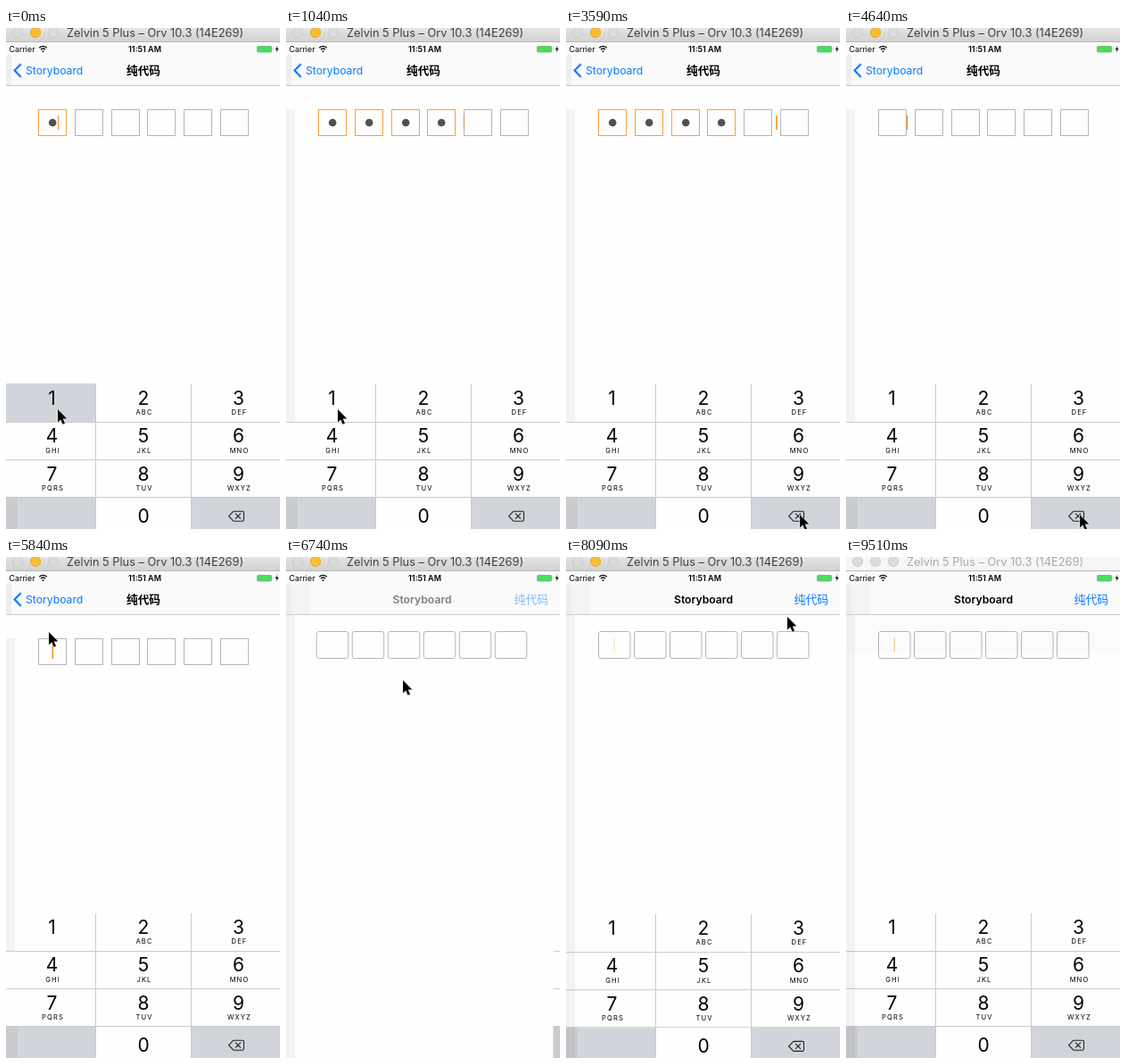
Write an HTML page that moves like this. It is 307 px wide and 561 px high and loops after 9.53 s.

```html
<!DOCTYPE html>
<html lang="zh">
<head>
<meta charset="utf-8">
<title>Passcode field demo</title>
<style>
  html, body { margin: 0; width: 100%; height: 100%; overflow: hidden; background: #fefefe; }
  svg { display: block; width: 307px; height: 561px; font-family: Inter, Roboto, "Liberation Sans", sans-serif; }
  .cjk { font-family: "Noto Sans CJK SC", "Noto Sans CJK", sans-serif; }
  .mid { text-anchor: middle; }
  .blue { fill: #0a7cff; }
  .digit { font-size: 21px; }
  .abc { font-size: 7.6px; letter-spacing: 1.1px; }
  .box { fill: #fefefe; stroke: #b6b6b6; }
  .box.on { stroke: #f9a13a; }
  .caret { fill: #ff8f1f; }
  .sep { stroke: #cbcbcd; fill: none; }
  #bar { fill: url(#metal); }
  #light { fill: #fdbd2e; stroke: #e2a73a; }
  #name { fill: #404040; font-size: 12.8px; }
  .idle #bar { fill: #f6f6f6; }
  .idle #light { fill: #dcdcdc; stroke: #cfcfcf; }
  .idle #name { fill: #a9a9a9; }
</style>
</head>
<body>
<svg id="stage" viewBox="0 0 307 561">
  <defs>
    <linearGradient id="metal" x2="0" y2="1">
      <stop stop-color="#e4e4e4"/><stop offset="1" stop-color="#d2d2d2"/>
    </linearGradient>
  </defs>
  <rect width="307" height="561" fill="#fefefe"/>

  <g id="story">
    <rect y="65" width="307" height="496" fill="#fefefe"/>
    <g id="storyBoxes"></g>
    <rect id="storyCaret" class="caret" x="53.5" y="90" width="1.5" height="16.5"/>
  </g>
  <g id="code">
    <rect y="65" width="307" height="496" fill="#fefefe"/>
    <g id="codeBoxes"></g>
    <rect id="codeCaret" class="caret" y="98" width="1.6" height="16"/>
  </g>

  <g id="pad">
    <rect y="398" width="307" height="163" fill="#fefefe"/>
    <rect id="one" y="398" width="100" height="43" fill="#d1d4db"/>
    <path d="M0 526h100v35H0z" fill="#d1d4db"/>
    <path d="M0 526h13v35H0z" fill="#c9cbcf"/>
    <rect id="back" x="208" y="526" width="99" height="35" fill="#d1d4db"/>
    <path class="sep" d="M100.5 399V561M207.5 399V561M0 441.5H307M0 483.5H307M0 525.5H307"/>
    <g id="keys"></g>
    <path id="erase" d="M249.7 546.7l4.6-5a1.6 1.6 0 0 1 1.2-.5h9.4a1.6 1.6 0 0 1 1.6 1.6v7.8a1.6 1.6 0 0 1-1.6 1.6h-9.4a1.6 1.6 0 0 1-1.2-.5zM257 543.7l6 6M263 543.7l-6 6" fill="none" stroke="#222" stroke-width="1.1"/>
  </g>
  <rect id="strip" width="10" fill="#000" opacity=".045"/>

  <rect y="16" width="307" height="48" fill="#fafafa"/>
  <path class="sep" d="M0 64.5H307"/>
  <path d="M0 31h6v33H0z" opacity=".05"/>
  <path id="navStrip" d="M6 31h22v33H6z" opacity=".025"/>
  <g id="codeNav">
    <g id="goBack">
      <path d="M16.8 40.3l-7.2 7.3 7.2 7.3" fill="none" stroke="#0a7cff" stroke-width="2.2"/>
      <text class="blue" x="22" y="52" font-size="12.2">Storyboard</text>
    </g>
    <text id="codeTitle" class="cjk mid" x="154" y="52" font-size="12.7" font-weight="700">纯代码</text>
  </g>
  <g id="storyNav">
    <text id="storyTitle" class="mid" x="154" y="52" font-size="12.2" font-weight="600">Storyboard</text>
    <text class="cjk blue" x="255.5" y="52" font-size="12.9">纯代码</text>
  </g>

  <text x="3.5" y="27" font-size="8.9">Carrier</text>
  <g fill="none" stroke="#111" stroke-width="1.3">
    <path d="M37.2 22.2a6.2 6.2 0 0 1 8.6 0M39 24.2a3.6 3.6 0 0 1 5 0"/>
    <path d="M41.5 24.9l1.3 1-1.3 1.4-1.3-1.4z" fill="#111" stroke="none"/>
  </g>
  <text class="mid" x="155.5" y="27" font-size="9" font-weight="600">11:51 AM</text>
  <rect x="281.5" y="20.5" width="16" height="6.5" rx="1.3" fill="#4cd964" stroke="#62c973"/>
  <path d="M298.7 22.3q1.6 1.4 0 2.8z" fill="#62c973"/>
  <path d="M304.3 20l-2.6 4.1h1.7l-.7 3.2 2.9-4.2h-1.8z"/>

  <g>
    <rect id="bar" width="307" height="15"/>
    <path d="M0 15.5H307" stroke="#b9b9b9"/>
    <circle cx="13" cy="5" r="5.6" fill="#dcdcdc" stroke="#c9c9c9"/>
    <circle id="light" cx="33" cy="5" r="5.6"/>
    <circle cx="53" cy="5" r="5.6" fill="#dcdcdc" stroke="#c9c9c9"/>
    <text id="name" x="68" y="10">Zelvin 5 Plus – Orv 10.3 (14E269)</text>
  </g>
  <rect id="tint" y="65" width="307" height="42" opacity=".012"/>
  <path id="mouse" d="M0 0V14.6L3.3 11.5 5.6 16.8 8 15.7 5.8 10.5H10.4Z" stroke="#fff" stroke-width="1" paint-order="stroke"/>
</svg>
<script>
const LOOP = 9530;
const $ = id => document.getElementById(id);
const set = (id, attrs) => { for (const k in attrs) $(id).setAttribute(k, attrs[k]); };
const move = (id, x, y = 0) => set(id, { transform: `translate(${x} ${y})` });
const show = (id, on) => set(id, { visibility: on ? 'visible' : 'hidden' });
const clamp = v => Math.max(0, Math.min(1, v));

// fields
const boxX = i => Math.round(36 + 40.8 * i);
let codeHtml = '', storyHtml = '';
for (let i = 0; i < 6; i++) {
  codeHtml += `<rect class="box" x="${boxX(i) + .5}" y="91.5" width="31" height="29"/>
    <circle cx="${boxX(i) + 16.2}" cy="106" r="4.3" fill="#505050"/>`;
  storyHtml += `<rect class="box" x="${36.5 + 40 * i}" y="83.5" width="35.5" height="30" rx="2.5"/>`;
}
$('codeBoxes').innerHTML = codeHtml;
$('storyBoxes').innerHTML = storyHtml;
const boxes = [...$('codeBoxes').querySelectorAll('rect')];
const dots = [...$('codeBoxes').querySelectorAll('circle')];

// number pad
const colX = [51.5, 154, 260.5];
const letters = ['', 'ABC', 'DEF', 'GHI', 'JKL', 'MNO', 'PQRS', 'TUV', 'WXYZ'];
$('keys').innerHTML = letters.map((abc, i) => {
  const x = colX[i % 3], y = 421.5 + 42.5 * Math.floor(i / 3);
  return `<text class="digit mid" x="${x}" y="${y}">${i + 1}</text>
    <text class="abc mid" x="${x + 1}" y="${y + 11.7}">${abc}</text>`;
}).join('') + '<text class="digit mid" x="154" y="554">0</text>';

const typed = [-70, 250, 565, 880, 1190, 1490];
const erased = [3400, 3450, 3780, 4030, 4280, 4480];
const POP = 6445, RISE = 7700;

const mousePath = [
  [0, 58, 427], [1550, 58, 427], [1790, 110, 465], [2090, 245, 535], [2240, 262, 544],
  [2800, 262, 544], [2900, 261, 545], [3140, 262, 545], [5140, 262, 545], [5390, 236, 428],
  [5540, 150, 280], [5690, 75, 140], [5840, 48, 84], [5990, 28, 52], [6140, 20, 44],
  [6440, 20, 44], [6590, 45, 70], [6740, 131, 138], [7040, 215, 105], [7340, 248, 67],
  [8240, 248, 67], [8540, 246, 420], [8680, 245, 540], [8980, 244, 555], [9130, 244, 575]
];
const blinkPath = [[0, .8], [.12, 0], [.46, 0], [.58, 1], [.9, 1], [1, .8]];

function track(path, t, c = 1) {
  const i = path.findIndex(p => p[0] > t);
  if (i < 0) return path[path.length - 1][c];
  const [a, b] = [path[i - 1], path[i]];
  return a[c] + (b[c] - a[c]) * (t - a[0]) / (b[0] - a[0]);
}

// share of the way still to go in a critically damped spring
function spring(ms, w) {
  const s = Math.max(0, ms) / 1000 * w;
  return (1 + s) * Math.exp(-s);
}

const ease = p => p * p * (3 - 2 * p);
const count = (times, t) => times.filter(e => e <= t).length;
const pressed = (times, t) => times.some(e => t >= e && t - e <= 120);

function tick(t) {
  const step = from => from + 150 * Math.floor((t - from) / 150);
  if (t < 1040) return Math.min(900, step(0));
  if (t < 8680) return step(1040);
  return t < 9510 ? step(8680) : 9510;
}

function drawField(t) {
  const n = count(typed, t) - count(erased, t);
  boxes.forEach((b, i) => b.classList.toggle('on', i < n));
  dots.forEach((d, i) => d.setAttribute('visibility', i < n ? 'inherit' : 'hidden'));
  const last = Math.max(...typed.concat(erased).filter(e => e <= t));
  const from = erased.includes(last) ? n + 1 : n - 1;
  const at = from + (n - from) * ease(clamp((t - last) / 280));
  set('codeCaret', { x: 51.5 + 40.8 * at, opacity: n < 6 ? track(blinkPath, t % 1000 / 1000) : 0 });
  show('one', pressed(typed, t));
  set('back', { fill: pressed(erased, t) ? '#fefefe' : '#d1d4db' });
  set('erase', { fill: pressed(erased, t) ? '#d1d4db' : 'none' });
}

function draw(t) {
  drawField(t);

  const left = spring(t - POP, 19), gone = 1 - left, popped = t > POP;
  move('story', -92 * left);
  move('code', 307 * gone);
  show('story', popped);
  set('code', { opacity: gone > .999 ? 0 : 1 });
  set('codeNav', { opacity: clamp(1 - 1.3 * gone) });
  set('goBack', { opacity: t >= 6400 ? .35 : 1 });
  move('codeTitle', 140 * gone);
  set('storyNav', { opacity: clamp((t - POP) / 600) });
  move('storyTitle', -60 * left);
  show('navStrip', popped);

  if (t < 7400) move('pad', 307 * gone);
  else move('pad', 0, 164 * spring(t - RISE, 18));
  set('storyCaret', { opacity: t > RISE ? track(blinkPath, t % 1000 / 1000) : 0 });

  set('strip', popped ? { y: 65, height: 496 } : { y: 91, height: 350 });
  show('strip', t >= 150);
  move('mouse', track(mousePath, t, 1), track(mousePath, t, 2));
  $('stage').classList.toggle('idle', t >= 9510);
  show('tint', t >= 9510);
}

const start = performance.now();
function loop() {
  draw(tick((performance.now() - start) % LOOP));
  requestAnimationFrame(loop);
}
loop();
</script>
</body>
</html>
```
